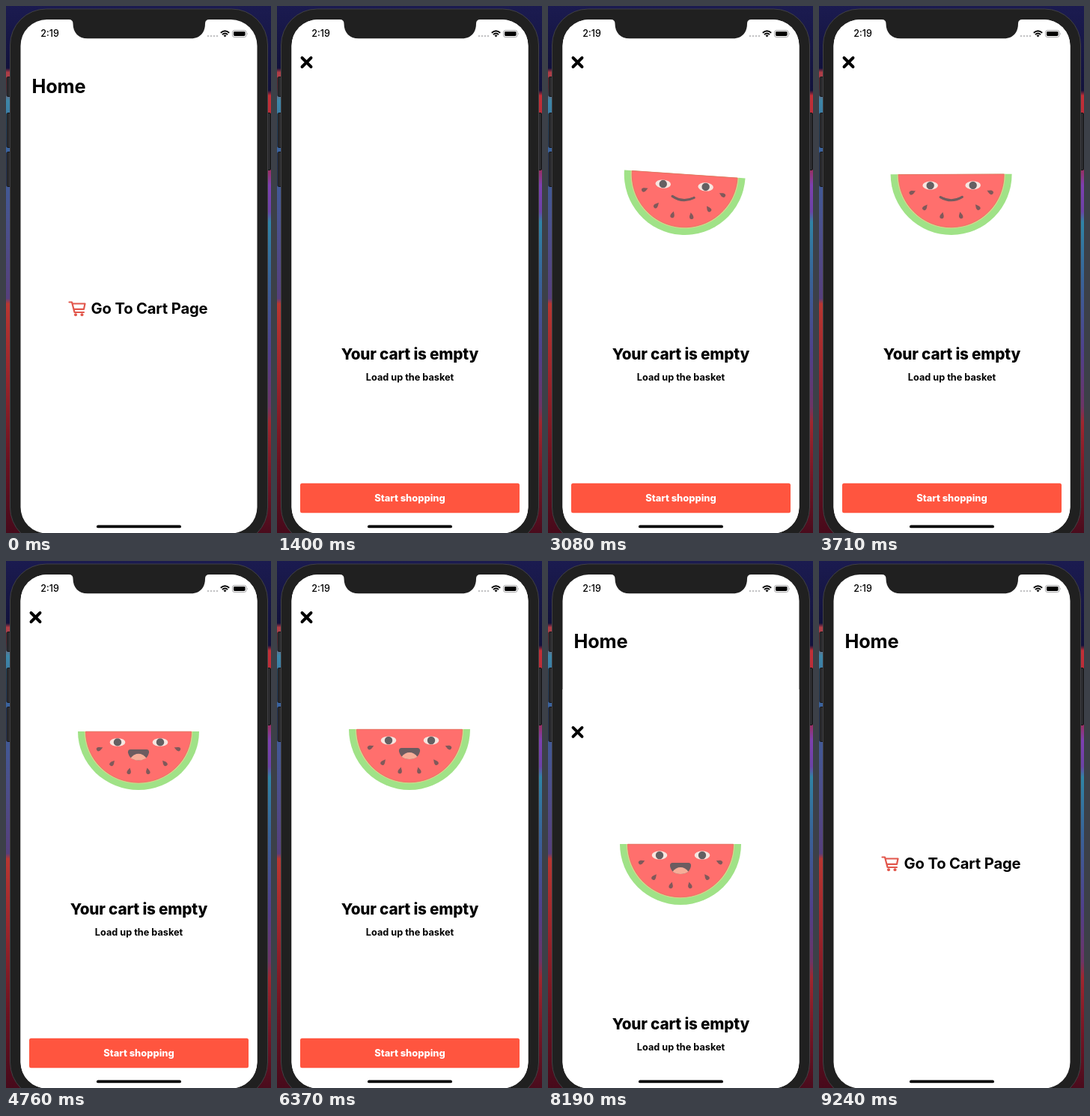
An HTML page for the animation above (9310 ms loop, 354 by 702 pixels).

```html
<!DOCTYPE html>
<html lang="en">
<head>
<meta charset="utf-8">
<title>Empty cart</title>
<style>
  html, body { margin: 0; width: 100%; height: 100%; overflow: hidden; background: #15153f; }
  svg { display: block; width: 354px; height: 702px; font-family: Inter, sans-serif; }
</style>
</head>
<body>
<svg viewBox="0 0 354 702">
  <defs>
    <linearGradient id="wallL" x2="0" y2="1">
      <stop offset="0" stop-color="#1b1b50"/>
      <stop offset=".118" stop-color="#12123c"/>
      <stop offset=".126" stop-color="#b03c44"/>
      <stop offset=".155" stop-color="#9a4a5c"/>
      <stop offset=".18" stop-color="#3d87a8"/>
      <stop offset=".28" stop-color="#3a5f9c"/>
      <stop offset=".42" stop-color="#4b508c"/>
      <stop offset=".555" stop-color="#563f7c"/>
      <stop offset=".565" stop-color="#b83631"/>
      <stop offset=".7" stop-color="#9c252b"/>
      <stop offset=".86" stop-color="#6c1220"/>
      <stop offset="1" stop-color="#470a1b"/>
    </linearGradient>
    <linearGradient id="wallR" x2="0" y2="1">
      <stop offset="0" stop-color="#1b1b50"/>
      <stop offset=".16" stop-color="#12123c"/>
      <stop offset=".17" stop-color="#c22f36"/>
      <stop offset=".3" stop-color="#a32842"/>
      <stop offset=".34" stop-color="#7d3fb0"/>
      <stop offset=".39" stop-color="#6c42a6"/>
      <stop offset=".41" stop-color="#2f84a6"/>
      <stop offset=".52" stop-color="#386298"/>
      <stop offset=".66" stop-color="#503f8c"/>
      <stop offset=".76" stop-color="#6d3466"/>
      <stop offset=".79" stop-color="#a0262e"/>
      <stop offset=".9" stop-color="#741424"/>
      <stop offset="1" stop-color="#4a0c1d"/>
    </linearGradient>
    <clipPath id="screen"><rect x="19.500" y="18" width="316" height="684.500" rx="35"/></clipPath>
  </defs>

  <rect width="177" height="702" fill="url(#wallL)"/>
  <rect x="177" width="177" height="702" fill="url(#wallR)"/>

  <g fill="#2b2b2e" stroke="#141416">
    <rect x="1" y="94.500" width="8" height="26" rx="1.500"/>
    <rect x="1" y="142.500" width="8" height="46" rx="1.500"/>
    <rect x="1" y="194.500" width="8" height="46" rx="1.500"/>
    <rect x="346" y="142.500" width="7.500" height="76" rx="1.500"/>
  </g>
  <rect x="5.500" y="4" width="344" height="712" rx="48" fill="#202020" stroke="#414144"/>

  <g clip-path="url(#screen)">
    <rect x="19" y="18" width="317" height="685" fill="#fff"/>
    <text x="34.500" y="115.700" font-size="25.300" font-weight="700" letter-spacing="-.2">Home</text>
    <g fill="none" stroke="#e2574c" stroke-width="2.200" stroke-linecap="round" stroke-linejoin="round">
      <path d="M84.500 394.500H88L91.500 408H104M89 396.500H105.500L104 403.800H91"/>
    </g>
    <g fill="#e2574c"><circle cx="93" cy="411.300" r="2"/><circle cx="101.500" cy="411.300" r="2"/></g>
    <text x="191.500" y="409.500" font-size="20.200" font-weight="700" letter-spacing="-.15" text-anchor="middle">Go To Cart Page</text>

    <g id="cart">
      <rect x="19" y="18" width="317" height="685" fill="#fff"/>
      <path d="M33.500 69L45.500 81M45.500 69L33.500 81" stroke="#000" stroke-width="3.900" stroke-linecap="round"/>
      <g id="melon">
        <path d="M-81 0A81 81 0 0 0 81 0Z" fill="#a0e287"/>
        <path d="M-72.300 0A72.300 72.300 0 0 0 72.300 0Z" fill="#d8d48c"/>
        <path d="M-70.500 .3A70.500 70.500 0 0 0 70.500 .3Z" fill="#ff6f6d" stroke="#e56b60" stroke-width=".8"/>
        <g id="seeds" fill="#80595a"></g>
        <g id="open"></g>
        <g id="shut" stroke="#735d5f" stroke-width="3.600" stroke-linecap="round">
          <path d="M-35.500 15H-20.500M21.500 15H36.500"/>
        </g>
        <path id="smile" d="M-14.500 30.500Q0 39 14.500 30.500" fill="none" stroke="#735d5f" stroke-width="3.200" stroke-linecap="round"/>
        <g id="mouth">
          <path d="M-10.500 25H10.500Q14.500 25 14 29.500C12.500 36.500 8 40 0 40S-12.500 36.500 -14 29.500Q-14.500 25 -10.500 25Z" fill="#6b5c60"/>
          <path d="M-10.500 36.800Q-6 31 0 31T10.500 36.800Q6 40 0 40T-10.500 36.800Z" fill="#f6ad98"/>
        </g>
      </g>
      <g text-anchor="middle">
        <text x="177.500" y="471.400" font-size="20.700" font-weight="800" letter-spacing="-.18">Your cart is empty</text>
        <text x="177.500" y="498.600" font-size="12.700" font-weight="700">Load up the basket</text>
        <rect x="31" y="635.700" width="293" height="39.600" rx="2.500" fill="#ff553f"/>
        <text x="177.500" y="660.300" font-size="12.900" font-weight="800" fill="#fff">Start shopping</text>
      </g>
    </g>

    <text x="46.300" y="41.300" font-size="12.500" font-weight="500">2:19</text>
    <g fill="#c4c4c6">
      <circle cx="270" cy="40" r="1.300"/><circle cx="274" cy="40" r="1.300"/>
      <circle cx="278" cy="40" r="1.300"/><circle cx="282" cy="40" r="1.300"/>
    </g>
    <g fill="none" stroke="#000" stroke-width="1.800">
      <path d="M286.800 35.700Q292.500 30.800 298.200 35.700M288.900 38Q292.500 35 296.100 38"/>
    </g>
    <path d="M290.500 39.300Q292.500 37.900 294.500 39.300L292.500 41.500Z"/>
    <rect x="302.500" y="32.500" width="18.500" height="9" rx="2.600" fill="none" stroke="#a5a5a7"/>
    <rect x="304" y="34" width="15.500" height="6" rx="1.400"/>
    <path d="M322 35.500Q323.700 37 322 38.500Z" fill="#a5a5a7"/>
    <rect x="121" y="691.500" width="113" height="3.800" rx="1.900"/>
  </g>
  <path d="M84 17V18Q89.500 18 89.500 23.500C89.500 35.500 97 43.300 109 43.300H247C259 43.300 266 35.500 266 23.500Q266 18 271.500 18V17Z" fill="#202020"/>
</svg>
<script>
const LOOP = 9310, REST = 177, RADIUS = 81, ROLL_RADIUS = 84;
const $ = id => document.getElementById(id);
const clamp = u => Math.min(1, Math.max(0, u));
const span = (t, a, b) => clamp((t - a) / (b - a));
const smooth = u => (1 - Math.cos(Math.PI * u)) / 2;
const settle = u => 1 - (1 - u) ** 4;

// [time, centre x] of the rolling slice
const roll = [[1500, -88], [2850, 187.5], [3420, 174], [3800, REST],
              [7350, REST], [7800, 172], [8200, REST]];

$('seeds').innerHTML = [[52, 24], [35, 44], [12.5, 55]].flatMap(([x, y]) => [-x, x].map(px => {
  const turn = Math.atan2(y, px) * 180 / Math.PI - 90;
  return `<path transform="translate(${px} ${y}) rotate(${turn})" d="M0 -4.700C1 -2.500 2.700 -.6 2.700 1.600A2.700 2.700 0 0 1 -2.700 1.600C-2.700 -.6 -1 -2.500 0 -4.700Z"/>`;
})).join('');

$('open').innerHTML = [-28, 29].map(x =>
  `<ellipse cx="${x}" cy="15" rx="10.300" ry="5.600" fill="#f6e6e0"/>` +
  `<circle cx="${x}" cy="15" r="5.200" fill="#646062"/>`).join('');

function track(keys, t) {
  let x = keys[0][1];
  for (let i = 1; i < keys.length; i++) {
    const [a, from] = keys[i - 1], [b, to] = keys[i];
    if (t >= a) x = from + (to - from) * smooth(span(t, a, b));
  }
  return x;
}

function show(el, on) { el.style.display = on ? '' : 'none'; }

function scaleAt(el, y, sy) {
  el.setAttribute('transform', `translate(0 ${y}) scale(1 ${sy}) translate(0 ${-y})`);
}

function draw(t) {
  const cover = settle(span(t, 700, 1200)) - smooth(span(t, 8050, 8500));
  show($('cart'), cover > 0);
  $('cart').setAttribute('transform', `translate(0 ${(1 - cover) * 685})`);

  const x = track(roll, t);
  const turn = (x - REST) / ROLL_RADIUS * 180 / Math.PI;
  const bob = t > 4160 && t < 5360 ? Math.sin(Math.PI * (t - 4160) / 400) ** 2 : 0;
  const squash = 1 - .036 * bob;
  $('melon').setAttribute('transform',
    `translate(${x} ${224 + RADIUS * (1 - squash)}) scale(1 ${squash}) rotate(${turn})`);

  const wake = span(t, 2500, 2640);
  show($('open'), wake > 0);
  show($('shut'), wake === 0);
  scaleAt($('open'), 15, wake);

  const talk = span(t, 3850, 4060);
  show($('smile'), talk === 0);
  show($('mouth'), talk > 0);
  scaleAt($('mouth'), 31, .25 + .75 * smooth(talk));
}

const start = performance.now();
function tick() {
  draw((performance.now() - start) % LOOP);
  requestAnimationFrame(tick);
}
tick();
</script>
</body>
</html>
```
